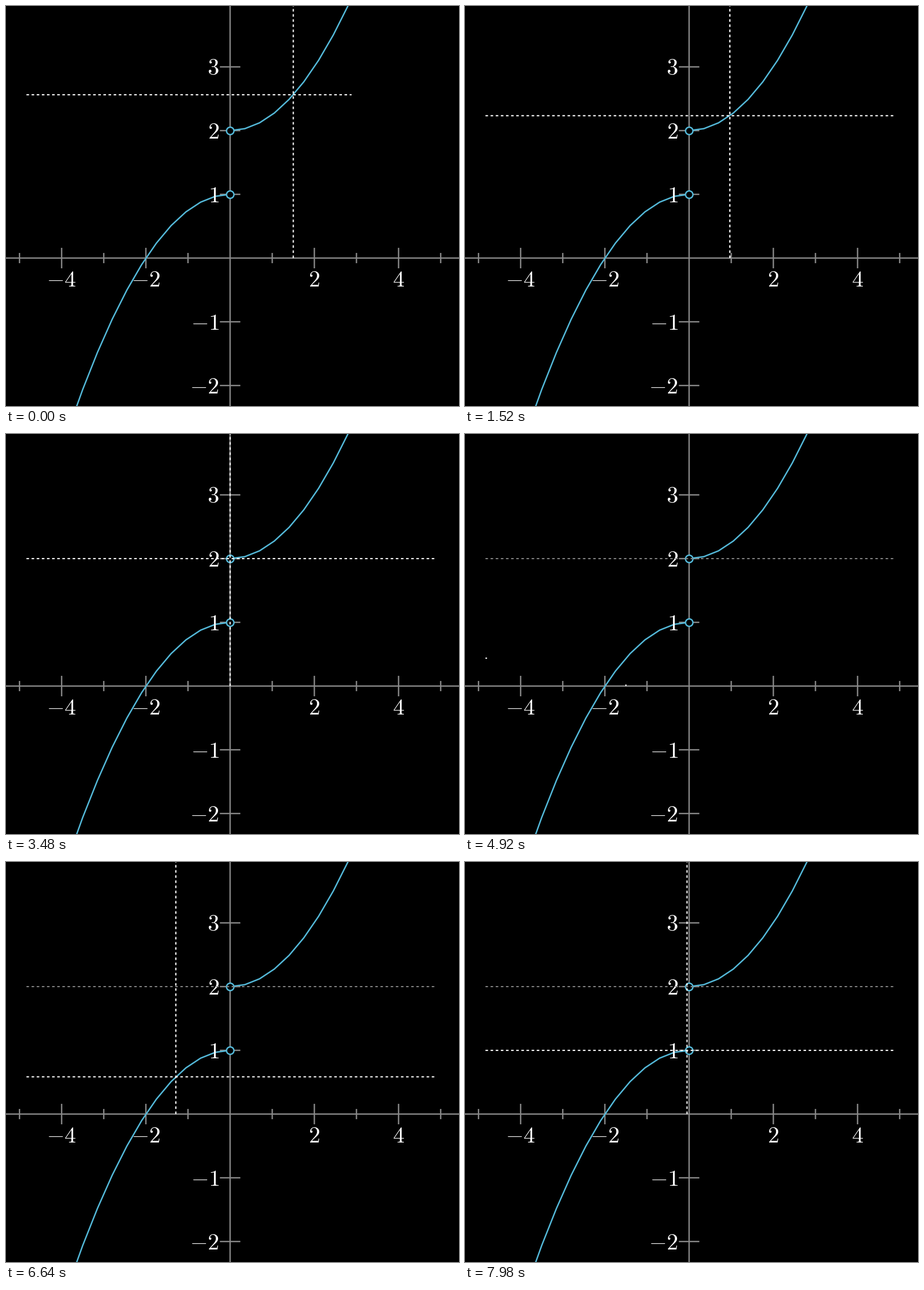
A matplotlib script that plays this animation: 797x703 px, repeating every 8000 ms.

```python
import numpy as np
import matplotlib.pyplot as plt
from matplotlib.animation import FuncAnimation
from matplotlib.collections import LineCollection

W, H, DPI = 797, 703, 64
STEP, LOOP = 20, 8000
OX, OY, UX, UY = 394.3, 443.0, 74.1, 112.0
GRAY, BLUE = "#888888", "#54b9d9"

# Guide lines: 80 dashes over a fixed length
LEFT, LENGTH, DASHES = 36.0, 717.5, 80
DASH = LENGTH / (2 * DASHES)
PITCH = (LENGTH - DASH) / (DASHES - 1)

CREATE_MS, MOVE_MS = 900, 2700
SWITCH = 4866            # the right-hand limit gives way to the left-hand one


def pt(px):
    return px * 72 / DPI


def sx(x):
    return OX + UX * x


def sy(y):
    return OY - UY * y


def func(x, side):
    return 2 + x**2 / 4 if side > 0 else 1 - x**2 / 4


def smooth(t):
    t = np.clip(t, 0, 1)
    edge = 1 / (1 + np.exp(5))
    return (1 / (1 + np.exp(-10 * (t - 0.5))) - edge) / (1 - 2 * edge)


def dashes(progress):
    """Start and end offsets of the dashes drawn so far."""
    reach = LENGTH * progress
    starts = np.arange(DASHES) * PITCH
    starts = starts[starts < reach]
    return list(zip(starts, np.minimum(starts + DASH, reach)))


def horizontal(y, progress=1):
    return [[(LEFT + a, y), (LEFT + b, y)] for a, b in dashes(progress)]


def vertical(x, progress=1):
    return [[(x, OY - a), (x, OY - b)] for a, b in dashes(progress)]


fig = plt.figure(figsize=(W / DPI, H / DPI), dpi=DPI, facecolor="black")
ax = fig.add_axes([0, 0, 1, 1])
ax.set_xlim(0, W)
ax.set_ylim(H, 0)
ax.axis("off")


def add_lines(segments, color, width, zorder):
    lines = LineCollection(segments, colors=color, linewidths=pt(width),
                           zorder=zorder, snap=False, capstyle="butt")
    return ax.add_collection(lines, autolim=False)


def add_label(x, y, value, ha):
    ax.text(x, y, f"${value}$", color="white", fontsize=pt(40.5), ha=ha,
            va="baseline", math_fontfamily="cm", zorder=4)


# Axes, ticks and numbers
grid = [[(-5, OY), (W + 5, OY)], [(OX, -5), (OX, H + 5)]]
for k in (-5, -4, -3, -2, -1, 1, 2, 3, 4, 5):
    half = 9 if k % 2 else 18
    grid.append([(sx(k), OY - half), (sx(k), OY + half)])
    if k % 2 == 0:
        add_label(sx(k) - 0.5, 493, k, "center")
for k in (-2, -1, 1, 2, 3):
    grid.append([(OX - 18, sy(k)), (OX + 18, sy(k))])
    add_label(375, sy(k) + 13.7, k, "right")
add_lines(grid, GRAY, 2.4, 1)

# The two branches, coarsely sampled, with open end points
for side in (-1, 1):
    xs = side * np.arange(0, 4.3, 0.35)
    ax.plot(sx(xs), sy(func(xs, side)), color=BLUE, lw=pt(2.5), zorder=2,
            snap=False)
    ax.plot(OX, sy(func(0, side)), "o", ms=pt(13), mfc="black", mec=BLUE,
            mew=pt(2.5), zorder=3, snap=False)

kept_line = add_lines([], GRAY, 1.9, 5)
guide_h = add_lines([], "white", 2.1, 6)
guide_v = add_lines([], "white", 2.1, 6)


def update(i):
    t = i * STEP
    side = 1 if t < SWITCH else -1
    create_start, move_start = (-571, 329) if side > 0 else (4880, 5768)
    drawn = smooth((t - create_start) / CREATE_MS)
    x = side * 1.5 * (1 - smooth((t - move_start) / MOVE_MS))
    guide_h.set_segments(horizontal(sy(func(x, side)), drawn))
    guide_v.set_segments(vertical(sx(x), drawn))
    kept_line.set_segments([] if side > 0 else horizontal(sy(2)))
    return kept_line, guide_h, guide_v


anim = FuncAnimation(fig, update, frames=LOOP // STEP, interval=STEP,
                     repeat=True, repeat_delay=0, blit=False)
plt.show()
```
